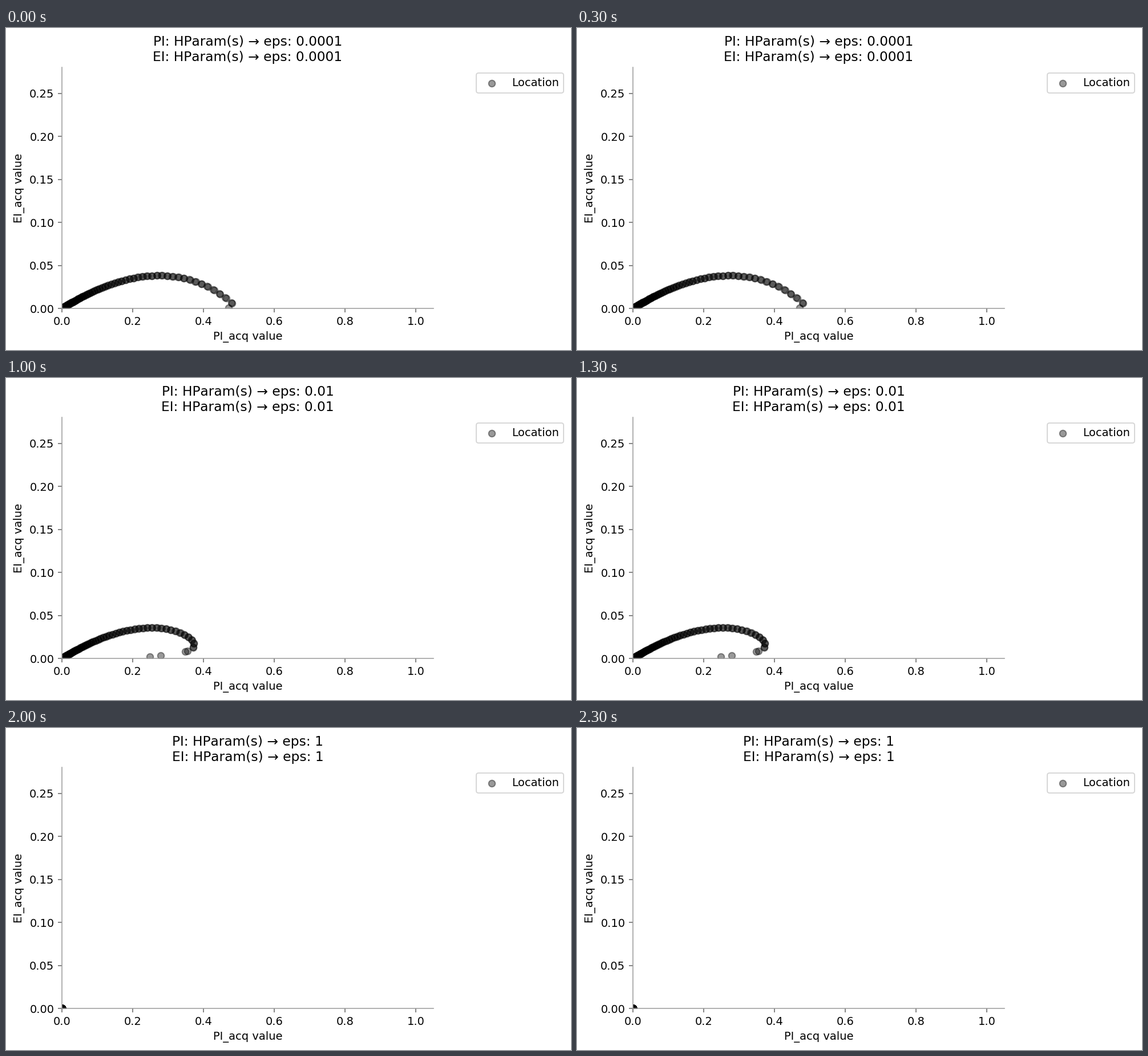
These frames come from a looping animation (990 px wide and 565 px high, 2500 ms). A matplotlib script:

```python
import math

import matplotlib.pyplot as plt
import numpy as np
from matplotlib.animation import FuncAnimation

WIDTH, HEIGHT, DPI = 990, 565, 140
EPSILONS = [0.0001, 0.001, 0.01, 0.1, 1]

# Gaussian process of unit variance around its best observation
BEST_VALUE = 5.22
STEP, OFFSET = 0.0296, 0.0025

plt.rcParams.update({"font.family": "DejaVu Sans", "font.size": 10,
                     "text.kerning_factor": 6})


def posterior():
    """Mean gap to the best value and standard deviation on a grid."""
    r = np.abs(np.arange(-200, 201) * STEP + OFFSET)
    k = (1 + r + r**2 / 3) * np.exp(-r)  # Matern 5/2
    return -BEST_VALUE * (1 - k), np.sqrt(1 - k**2)


def acquisition(eps):
    """Columns of PI and EI for the given exploration margin."""
    z = (GAP - eps) / SIGMA
    cdf = np.array([0.5 * math.erfc(-v / math.sqrt(2)) for v in z])
    pdf = np.exp(-z**2 / 2) / math.sqrt(2 * math.pi)
    return np.column_stack([cdf, SIGMA * (z * cdf + pdf)])


GAP, SIGMA = posterior()
POINTS = [acquisition(eps) for eps in EPSILONS]

# the small margin keeps the pixel size from being truncated
fig = plt.figure(figsize=((WIDTH + 0.01) / DPI, (HEIGHT + 0.01) / DPI),
                 dpi=DPI, facecolor="white")
left, right, top, bottom = 98, 749, 69.3, 492
ax = fig.add_axes([left / WIDTH, 1 - bottom / HEIGHT,
                   (right - left) / WIDTH, (bottom - top) / HEIGHT])
ax.set(xlim=(0, 1.05), ylim=(0, 0.28),
       xlabel="PI_acq value", ylabel="EI_acq value")
ax.set_xticks(np.arange(0, 1.1, 0.2))
ax.set_yticks(np.arange(0, 0.26, 0.05))
ax.tick_params(color="#666666")
for side in ("top", "right"):
    ax.spines[side].set_visible(False)
for side in ("left", "bottom"):
    ax.spines[side].set_color("#9c9c9c")

dots = ax.scatter([], [], s=36, color="black", alpha=0.4, label="Location")
ax.legend(loc="upper left", bbox_to_anchor=(1.1, 1))
title = ax.set_title("", fontsize=12)


def update(i):
    dots.set_offsets(POINTS[i])
    title.set_text("\n".join(f"{name}: HParam(s) \u2192 eps: {EPSILONS[i]}"
                             for name in ("PI", "EI")))
    return dots, title


anim = FuncAnimation(fig, update, frames=len(EPSILONS), interval=500,
                     repeat=True, repeat_delay=0, blit=False)
plt.show()
```
